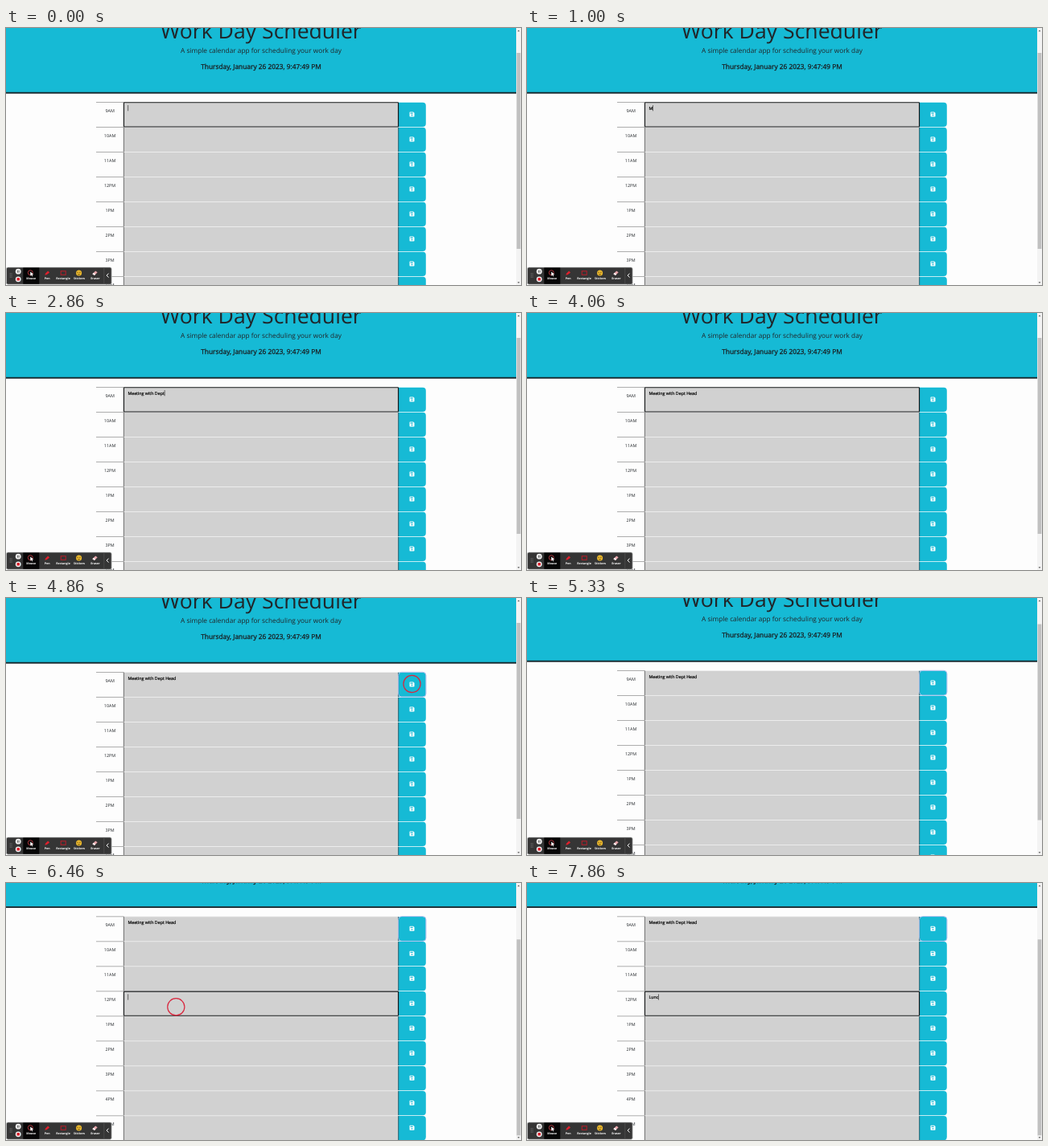
An HTML page that plays this animation: 640 by 320 pixels, repeating every 8000 ms.

```html
<!DOCTYPE html>
<html lang="en">
<head>
<meta charset="utf-8">
<title>Work Day Scheduler</title>
<style>
  html, body { margin: 0; width: 100%; height: 100%; overflow: hidden; background: #fdfdfd; }
  svg { display: block; width: 640px; height: 320px; font-family: "Open Sans", sans-serif; text-rendering: geometricPrecision; }
  text { white-space: pre; fill: #212529; }
  .mid { text-anchor: middle; }
  .strong { stroke: #15191c; stroke-width: .28px; }
  .note { font-size: 5.31px; fill: #080808; stroke: #080808; stroke-width: .2px; }
  .tool { font-size: 3.6px; font-weight: 700; fill: #fff; }
</style>
</head>
<body>
<svg viewBox="0 0 640 320">
  <g id="page">
    <rect y="-60" width="634" height="140" fill="#16bad5"/>
    <rect y="79.8" width="634" height="1.9" fill="#14292f"/>
    <text class="mid" x="316.7" y="13" font-size="26.6">Work Day Scheduler</text>
    <text class="mid" x="317" y="31" font-size="8.3">A simple calendar app for scheduling your work day</text>
    <text class="mid strong" x="317" y="50.6" font-size="8.35">Thursday, January 26 2023, 9:47:49 PM</text>
    <g id="rows"></g>
    <rect id="ring" x="487.6" y="92.3" width="34.3" height="30.8" rx="4" fill="none" stroke="#a9bdec" stroke-width="1"/>
    <rect id="focus" x="146.5" width="341" height="30.2" rx=".8" fill="none" stroke="#16181a" stroke-width="1.1"/>
    <text id="note0" class="note" x="151.4" y="101.6"></text>
    <text id="note3" class="note" x="151.4" y="194.6"></text>
    <rect id="caret" width=".7" height="7.2" fill="#333"/>
  </g>

  <rect x="634" width="6" height="320" fill="#f3f3f3"/>
  <rect id="thumb" x="634.6" width="4.8" height="244" fill="#c1c1c1"/>
  <path d="M635.6 4.2l1.4-1.8 1.4 1.8zM635.6 316.2l1.4 1.8 1.4-1.8z" fill="#555"/>

  <circle id="click" r="10.6" fill="none" stroke="#d8283f" stroke-width="1.2"/>

  <g id="bar">
    <rect x=".4" y="297.9" width="130.8" height="21.4" rx="2" fill="#353535" stroke="#c9cccb" stroke-width=".8"/>
    <rect x="21.3" y="298.5" width="20" height="20.2" fill="#060606"/>
    <path d="M121.8 298.5V318.8" stroke="#5a5a5a" stroke-width=".6"/>
    <path d="M5.2 305.5v6M7 305.5v6" stroke="#aaa" stroke-width=".8" stroke-dasharray=".8 1.3"/>
    <circle cx="15.2" cy="303.2" r="3.4" fill="#f4f4f4"/>
    <path d="M14.3 301.7v3M16.1 301.7v3" stroke="#333" stroke-width=".8"/>
    <circle cx="15.2" cy="312.8" r="3.4" fill="#f4f4f4"/>
    <rect x="13.4" y="311" width="3.6" height="3.6" rx=".7" fill="#d8202c"/>
    <circle cx="30.3" cy="304.7" r="3" fill="none" stroke="#d8404a" stroke-width=".8"/>
    <path d="M30.2 303.6l4 3.2-1.8.3 1 1.8-.9.4-1-1.8-1.2 1.2z" fill="#fff"/>
    <path d="M48.3 307.8l.8-2.4 3-3 2 2-3.2 2.7z" fill="#e0202c"/>
    <rect x="68.2" y="302.7" width="6" height="4.6" fill="none" stroke="#b91e2a" stroke-width="1"/>
    <circle cx="90.6" cy="305" r="3.5" fill="#f4c02e"/>
    <path d="M88.4 304.2h1.7M91 304.2h1.7M89 306.3q1.6 1.5 3.2 0" fill="none" stroke="#4a3210" stroke-width=".8"/>
    <path d="M107.4 306.2l3.8-3.8 2.5 1.8-3.8 3.8z" fill="#e9a7ac"/>
    <path d="M107.4 306.2l1.5-1.5 2.5 1.8-1.5 1.5z" fill="#f5f0f0"/>
    <path d="M127.5 305.6l-2.4 2.5 2.4 2.5" fill="none" stroke="#fff" stroke-width="1"/>
  </g>
</svg>
<script>
const $ = id => document.getElementById(id);
const LOOP = 8000, TOP = 92.5, PITCH = 31;

$('rows').innerHTML = [9, 10, 11, 12, 1, 2, 3, 4, 5].map((hour, i) => {
  const y = TOP + i * PITCH;
  const half = i < 3 ? 'AM' : 'PM';
  return `<path d="M112 ${y}H146" stroke="#9a9a9a" stroke-width=".8"/>
    <text class="mid" x="129.1" y="${y + 12.6}" font-size="5.4">${hour}${half}</text>
    <rect x="146" y="${y}" width="342" height="${PITCH}" fill="#d1d1d1"/>
    <path d="M146 ${y}H488" stroke="#f0f0f0" stroke-width=".8"/>
    <path d="M146.4 ${y}v${PITCH}" stroke="#555" stroke-width=".8"/>
    <path d="M487.6 ${y + .3}h30.2a4 4 0 0 1 4 4v22.2a4 4 0 0 1 -4 4h-30.2z" fill="#16bad5"/>
    <path d="M487.7 ${y + .3}v30.2" stroke="#1c4650" stroke-width=".8"/>
    <g transform="translate(501.5 ${y + 11.9})">
      <path d="M.6 0H4.6L6 1.4V5.4a.6 .6 0 0 1 -.6 .6H.6a.6 .6 0 0 1 -.6 -.6V.6A.6 .6 0 0 1 .6 0z" fill="#fff"/>
      <path d="M1 1h3.2v1.3H1z" fill="#16bad5"/><circle cx="3" cy="4.1" r=".9" fill="#16bad5"/>
    </g>`;
}).join('');

['Mouse', 'Pen', 'Rectangle', 'Stickers', 'Eraser'].forEach((name, i) => {
  const x = [31.2, 51.2, 71, 91, 111][i];
  $('bar').insertAdjacentHTML('beforeend', `<text class="mid tool" x="${x}" y="313.4">${name}</text>`);
});

// Key press times for each note
const notes = [
  { el: $('note0'), row: 0, text: 'Meeting with Dept Head',
    keys: [930, 1060, 1190, 1400, 1530, 1600, 1730, 1860, 1930, 2060, 2130,
           2200, 2330, 2460, 2660, 2800, 2860, 3000, 3060, 3200, 3400, 3560] },
  { el: $('note3'), row: 3, text: 'Lunch', keys: [7330, 7460, 7600, 7800] }
];
const scrolls = [[0, 0], [5330, 2], [5400, 22], [5460, 44.6], [5530, 48.6], [5600, 50], [5660, 50.4], [5730, 50.7]];
const carets = [[0, 1], [400, 0], [930, 1], [4060, 0], [4600, 1], [4800, 0], [6460, 1], [7060, 0], [7330, 1]];
const clicks = [[4800, 504.5, 107], [6460, 211.3, 154.3]];

const held = (steps, t) => steps.reduce((v, s) => t >= s[0] ? s[1] : v, 0);
const show = (el, on) => el.setAttribute('visibility', on ? 'visible' : 'hidden');

function draw(t) {
  const scroll = held(scrolls, t);
  $('page').setAttribute('transform', `translate(0 ${-scroll})`);
  $('thumb').setAttribute('y', 31 + scroll * .775);

  for (const n of notes) {
    const typed = n.text.slice(0, n.keys.filter(k => t >= k).length);
    if (n.el.textContent !== typed) n.el.textContent = typed;
  }

  const saved = t >= 4800, second = t >= 6460;
  const note = notes[second ? 1 : 0];
  const y = TOP + note.row * PITCH;
  show($('focus'), !saved || second);
  $('focus').setAttribute('y', y + .3);
  show($('ring'), saved);
  show($('caret'), held(carets, t));
  const width = note.el.textContent ? note.el.getComputedTextLength() : 0;
  $('caret').setAttribute('x', 151.4 + width);
  $('caret').setAttribute('y', y + 3.6);

  const hit = clicks.find(c => t >= c[0] && t < c[0] + 200);
  show($('click'), hit);
  if (hit) {
    $('click').setAttribute('cx', hit[1]);
    $('click').setAttribute('cy', hit[2]);
    $('click').setAttribute('opacity', held([[0, 1], [70, .7], [140, .35]], t - hit[0]));
  }
}

function tick() {
  draw(performance.now() % LOOP);
  requestAnimationFrame(tick);
}
tick();
</script>
</body>
</html>
```
